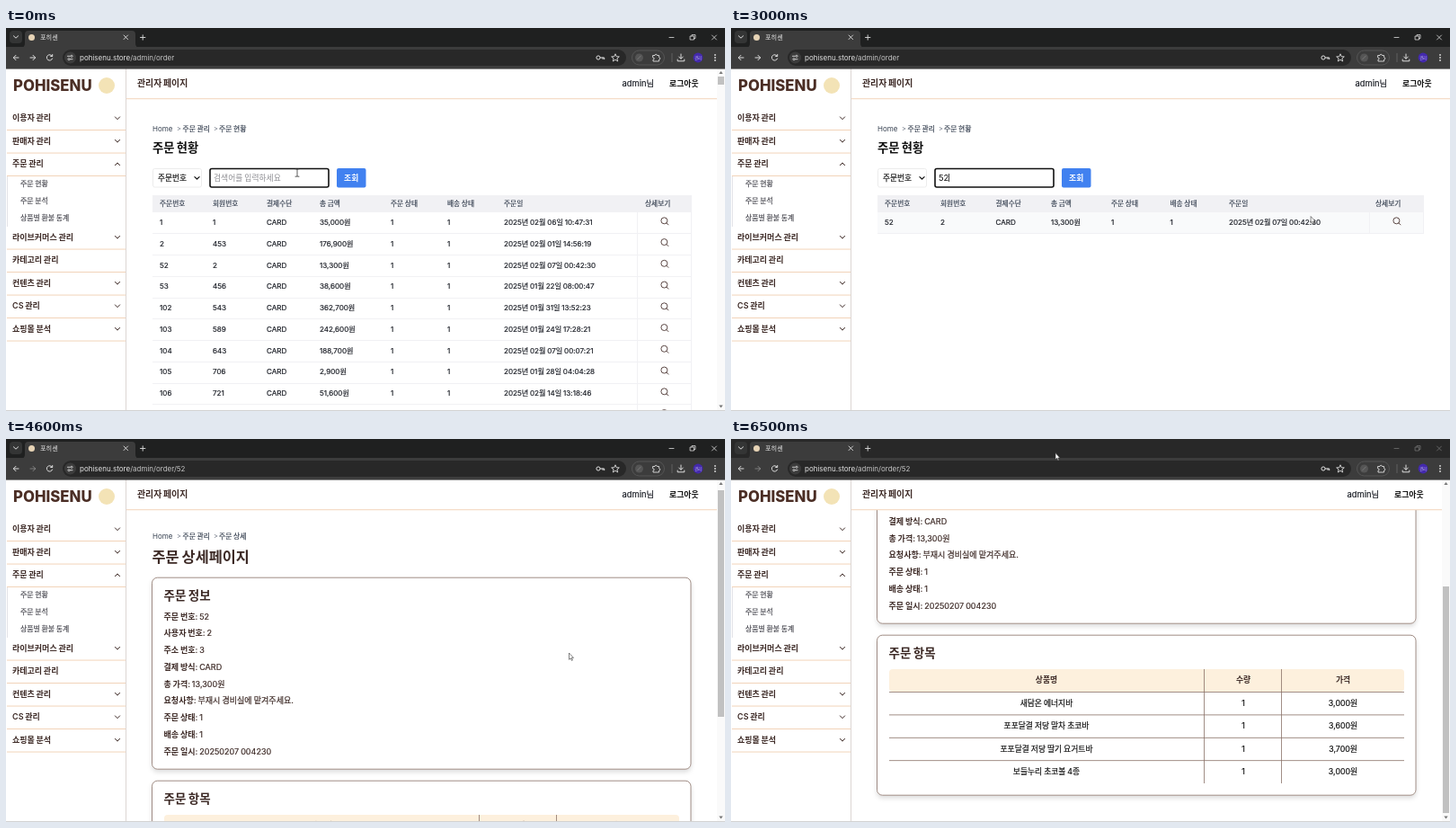
An HTML page for the animation above (6600 ms loop, 800 by 426 pixels).

```html
<!DOCTYPE html>
<html lang="ko">
<head>
<meta charset="utf-8">
<title>주문 관리</title>
<style>
  html, body { margin: 0; width: 100%; height: 100%; overflow: hidden; background: #fff; }
  svg { display: block; width: 100%; height: 100%; }
  text { font-family: Inter, 'Noto Sans CJK KR', 'Noto Sans CJK', sans-serif; white-space: pre; word-spacing: -.06em; }
  .hide { display: none; }
</style>
</head>
<body>
<svg id="stage" viewBox="0 0 800 426" xmlns="http://www.w3.org/2000/svg"></svg>
<script>
const LOOP = 6600, STEP = 100;
const BROWN = '#3d2a26', INK = '#1c1f27', PEACH = '#f1cfb2', RULE = '#8a7268', PALE = '#f1f1f4';

// Drawing helpers; text is placed by its vertical centre. Medium weight is thickened by a hairline.
const text = (x, y, s, size, fill = INK, weight = 400, extra = '') =>
  `<text x="${x}" y="${(y + size * 0.37).toFixed(2)}" font-size="${size}" fill="${fill}" ` +
  (weight === 500 ? `stroke="${fill}" stroke-width=".2" ` : `font-weight="${weight}" `) + `${extra}>${s}</text>`;
const mid = (x, y, s, size, fill, weight) => text(x, y, s, size, fill, weight, 'text-anchor="middle"');
const rect = (x, y, w, h, fill, r = 0, extra = '') =>
  `<rect x="${x}" y="${y}" width="${w}" height="${h}" rx="${r}" fill="${fill}" ${extra}/>`;
const line = (d, stroke, w = 1, extra = '') =>
  `<path d="${d}" fill="none" stroke="${stroke}" stroke-width="${w}" stroke-linecap="round" stroke-linejoin="round" ${extra}/>`;
const circle = (x, y, r, fill, extra = '') => `<circle cx="${x}" cy="${y}" r="${r}" fill="${fill}" ${extra}/>`;
const group = (id, body, extra = '') => `<g id="${id}" ${extra}>${body}</g>`;
const chevron = (x, y, k, color, w = 1) => line(`M${x - 2.6} ${y - k}L${x} ${y + k}L${x + 2.6} ${y - k}`, color, w);
const lens = (x, y) => circle(x - 0.6, y - 0.7, 3.5, 'none', 'stroke="#4a3430" stroke-width=".9"') +
  line(`M${x + 2} ${y + 1.9}l2 2`, '#4a3430', 0.9);

function browser() {
  const c = '#dedede';
  const bar = rect(0, 0, 800, 22, '#1f2020', 0, 'id="frame"') +
    rect(4, 3, 14, 14, '#343535', 4) + chevron(11, 10, 1.2, c) +
    `<path d="M16 22Q21 22 21 17V7Q21 3 25 3H140Q144 3 144 7V17Q144 22 149 22Z" fill="#3c3c3c"/>` +
    circle(28.5, 10.5, 3.5, '#e6d3b5') + text(38, 10.5, '포히센', 7.2, '#e8e8e8') +
    line('M131 8l4.6 4.6M135.6 8l-4.6 4.6', c, 0.9) + line('M149.5 10.5h5.4M152.2 7.8v5.4', c, 0.9);
  const win = group('win', line('M738 10.5h5', c, 0.8) +
    line('M761.5 9h4v4h-4zM763 9v-1.4h4v4h-1.5', c, 0.8) + line('M785.5 8l5 5M790.5 8l-5 5', c, 0.8));
  const tools = rect(0, 21, 800, 24.6, '#3c3c3c') + line('M14 33H8.5M11 30.3L8.3 33L11 35.7', c) +
    group('fwd', line('M27 33h5.5M30 30.3L32.7 33L30 35.7', c)) +
    line('M51.3 31.2A3.2 3.2 0 1 0 51.6 34M51.7 29.5v2h-2', c) +
    rect(63, 24, 627, 18, '#282828', 9) + circle(71.5, 33, 6.5, '#3c3c3c') +
    line('M68.5 31.3h2.6M74 34.7h-2.6', c, 0.9) + circle(73, 31.3, 1.1, 'none', `stroke="${c}" stroke-width=".8"`) +
    circle(70, 34.7, 1.1, 'none', `stroke="${c}" stroke-width=".8"`) +
    text(82, 33, '', 8, '#e4e4e4', 400, 'id="url"') +
    circle(659, 33, 2.1, 'none', `stroke="${c}"`) + line('M661.3 33h4.4v1.7M664 33v1.5', c) +
    `<path d="M678 28.8l1.2 2.9 3.1.2-2.4 2 .8 3.1-2.7-1.7-2.7 1.7.8-3.1-2.4-2 3.1-.2z" fill="none" stroke="${c}" stroke-width=".9"/>` +
    rect(696.5, 25, 36, 16, 'none', 8, 'stroke="#555"') + circle(704.5, 33, 4.5, '#555') +
    line('M702.5 35l3.8-4', '#777') +
    line('M720 30.5h2a1.2 1.2 0 0 1 2.4 0h2.2v2.2a1.2 1.2 0 0 1 0 2.4v1.9h-6.6v-1.8a1.2 1.2 0 0 0 0-2.4z', c, 0.9) +
    rect(740.5, 28, 1, 10, '#606060') + line('M751 29v5M748.7 32l2.3 2.3 2.3-2.3M747.2 35v1.8h7.6V35', c) +
    circle(770, 33, 5.4, '#4329ad') + mid(770, 33, '관리', 4.2, '#cfc8ee') +
    [30, 33, 36].map(y => circle(789, y, 0.9, c)).join('');
  return bar + win + tools;
}

function sidebar() {
  const items = [['이용자 관리', 100, 1], ['판매자 관리', 125.5, 1], ['주문 관리', 151, -1], ['라이브커머스 관리', 232.5, 1],
    ['카테고리 관리', 258, 0], ['컨텐츠 관리', 283.5, 1], ['CS 관리', 309, 1], ['쇼핑몰 분석', 334.5, 1]];
  const subs = ['주문 현황', '주문 분석', '상품별 환불 통계'];
  return rect(0, 45, 133, 380, '#fff') + rect(133, 45, 1, 380, '#dcd6d3') +
    text(8, 64, 'POHISENU', 16.8, '#4b2e25', 800) + circle(112, 64, 9, '#f3e3b6') +
    items.map(([s, y, dir]) => text(7, y, s, 9, BROWN, 600) + rect(1, y + 13.1, 132, 0.9, PEACH) +
      (dir ? chevron(124, y + 0.3, 1.4 * dir, BROWN) : '')).join('') +
    rect(1, 165, 1, 56, '#e3e3e8') +
    subs.map((s, i) => text(16, 173.2 + i * 18.8, s, 7.9, '#4a4a52', 500)).join('');
}

const crumbs = (y, last) => text(163, y, 'Home', 8, '#374151') + text(190, y, '&gt;', 7.5, '#6b7280') +
  text(196.5, y, '주문 관리', 7.8, '#374151', 500) + text(231, y, '&gt;', 7.5, '#6b7280') + text(237, y, last, 7.8, '#374151', 500);

function table(id, cols, edge, rows) {
  const heads = ['주문번호', '회원번호', '결제수단', '총 금액', '주문 상태', '배송 상태', '주문일', '상세보기'];
  const cell = edge - 61, pitch = 23.75;
  const body = rows.map((row, i) => {
    const y = 216 + i * pitch, vals = [row[0], row[1], 'CARD', row[2] + '원', 1, 1, row[3]];
    return (row[0] ? vals.map((v, k) => text(cols[k], y, v, 8.1, INK, 500)).join('') : '') +
      rect(163, Math.round(y + 12.3), edge - 163, 1, PALE) + lens(cell + 31, y - 1);
  }).join('');
  const h = rows.length * pitch;
  return group(id, rect(163, 186, edge - 163, 19, PALE) + (rows.length < 2 ? rect(163, 205, edge - 163, 24, '#f9fafb', 0, 'id="hover"') : '') +
    heads.map((s, k) => text(cols[k], 194.7, s, 7.7, '#374151', 500)).join('') + body +
    rect(cell, 205, 1, h, PALE) + rect(edge - 1, 205, 1, h, PALE));
}

function listPage() {
  const day = (m, d, clock) => `2025년 ${m}월 ${d}일 ${clock}`;
  const hit = [52, 2, '13,300', day('02', '07', '00:42:30')];
  const rows = [[1, 1, '35,000', day('02', '06', '10:47:31')], [2, 453, '176,900', day('02', '01', '14:56:19')], hit,
    [53, 456, '38,600', day('01', '22', '08:00:47')], [102, 543, '362,700', day('01', '31', '13:52:23')],
    [103, 589, '242,600', day('01', '24', '17:28:21')], [104, 643, '188,700', day('02', '07', '00:07:21')],
    [105, 706, '2,900', day('01', '28', '04:04:28')], [106, 721, '51,600', day('02', '14', '13:18:46')], ['']];
  return group('list', crumbs(112.5, '주문 현황') + text(163, 133, '주문 현황', 13.3, '#111', 700) +
    rect(163.5, 156.5, 54, 20.5, '#fff', 2, 'stroke="#ececec"') + text(169, 166.5, '주문번호', 8.7, '#111', 500) +
    chevron(212.5, 166.8, 1.2, '#111', 1.2) +
    rect(227, 156.5, 132, 20.5, '#fff', 2, 'id="field"') + text(231, 166.3, '', 9, '#111', 400, 'id="query"') +
    rect(242, 162, 0.8, 9, '#111', 0, 'id="caret"') +
    rect(368, 156, 32.5, 21.5, '#4181f0', 2) + mid(384.2, 166.5, '조회', 8.8, '#fff', 600) +
    table('all', [171, 230, 290, 349, 428, 491, 554, 711], 763, rows) +
    table('found', [171, 233, 294.5, 356, 423, 488.5, 554, 717], 771, [hit]));
}

function detailPage() {
  const info = [['주문 번호', 52], ['사용자 번호', 2], ['주소 번호', 3], ['결제 방식', 'CARD'], ['총 가격', '13,300원'],
    ['요청사항', '부재시 경비실에 맡겨주세요.'], ['주문 상태', 1], ['배송 상태', 1], ['주문 일시', '20250207 004230']];
  const goods = [['상품명', '수량', '가격'], ['새담온 에너지바', 1, '3,000원'], ['포포달결 저당 말차 초코바', 1, '3,600원'],
    ['포포달결 저당 딸기 요거트바', 1, '3,700원'], ['보들누리 초코볼 4종', 1, '3,000원']];
  const card = (y, h) => rect(162.5, y, 599.5, h, '#fff', 6, `stroke="${RULE}" stroke-width=".8" filter="url(#soft)"`);
  const infoRows = info.map(([k, v], i) => text(175.5, 197.2 + i * 18.75,
    `${k}: <tspan font-weight="400" fill="${BROWN}" stroke="${BROWN}" stroke-width=".2">${v}</tspan>`, 9.05, BROWN, 600)).join('');
  const goodRows = goods.map((row, i) => {
    const y = 430.2 + i * 25.4;
    return row.map((v, k) => mid([351, 570, 681][k], y, v, 8.8, i ? '#111' : BROWN, i ? 500 : 600)).join('') +
      (i < 4 ? rect(176, y + 12.9, 573, 0.8, RULE) : '');
  }).join('');
  return `<g id="detail" clip-path="url(#view)">` + group('scroll',
    crumbs(108, '주문 상세') + text(162.5, 130.5, '주문 상세페이지', 16.4, BROWN, 700) +
    card(154.2, 213) + text(175.5, 173.5, '주문 정보', 13.5, BROWN, 700) + infoRows +
    card(380.2, 178) + text(175.5, 399.5, '주문 항목', 13.5, BROWN, 700) +
    rect(176, 418, 573, 25, '#fdf0dd', 4) + goodRows +
    rect(526.1, 418, 0.8, 127, RULE) + rect(612.1, 418, 0.8, 127, RULE)) + '</g>';
}

const header = rect(134, 45, 666, 34, '#fff') + rect(134, 78.3, 666, 0.9, PEACH) +
  text(146, 61.5, '관리자 페이지', 9.9, BROWN, 700) +
  group('user', text(685.5, 61.5, 'admin님', 9.4, INK, 500) + text(738, 61.5, '로그아웃', 8.9, '#111', 600));
const scrollbar = group('bar', rect(791, 45, 9, 380, '#fafafa') + rect(792, 54, 7, 9, '#c1c1c1', 0, 'id="thumb"') +
  '<path d="M793.3 51l2.2-3 2.2 3zM793.3 419.500l2.2 3 2.2-3z" fill="#777"/>');
const cursors = group('cursor',
  group('ibeam', line('M-2-4.200h1.500l.5.5.5-.5H2M0-4V4M-2 4.200h1.500l.5-.5.5.5H2', '#333', 0.8)) +
  group('arrow', '<path d="M0 0V7.300l1.700-1.500 1.200 2.600 1.100-.5-1.200-2.500H5z" fill="#fff" stroke="#333" stroke-width=".6"/>') +
  group('hand', '<path d="M-.8 3.500V-2.500q0-1 .9-1t.9 1V0q2.700-.3 2.900 1.400v2.100q0 2.300-1.300 3H-.4L-3 2.900q-.2-1.200 1-.9z" fill="#fff" stroke="#222" stroke-width=".7"/>'));

document.getElementById('stage').innerHTML =
  `<defs><clipPath id="view"><rect x="134" y="79" width="657" height="346"/></clipPath>
   <filter id="soft" x="-5%" y="-10%" width="110%" height="125%"><feDropShadow dx="0" dy="3" stdDeviation="2.500" flood-opacity=".13"/></filter></defs>` +
  rect(0, 0, 800, 426, '#fff') + listPage() + detailPage() + header + sidebar() + scrollbar +
  rect(0, 425, 800, 1, '#d2d2d2') + browser() + cursors;

const $ = id => document.getElementById(id);
const set = (id, attrs) => { for (const k in attrs) $(id).setAttribute(k, attrs[k]); };
const show = (id, on) => $(id).classList.toggle('hide', !on);
const clamp = v => Math.max(0, Math.min(1, v));
const ease = v => v * v * (3 - 2 * v);

// Pointer stops: time, x, y
const path = [[0, 324, 161], [1900, 324, 161], [2200, 365.5, 185.5], [2400, 365.5, 185.5], [3300, 743, 218],
  [3900, 743, 218], [4500, 626.5, 238], [4800, 626.5, 238], [5200, 621.5, 215], [5700, 621.5, 215], [6400, 361, 15.5], [LOOP, 361, 15.5]];

function pointer(t) {
  const i = path.findIndex(p => p[0] > t), a = path[i - 1], b = path[i];
  const k = ease((t - a[0]) / (b[0] - a[0]));
  return [a[1] + (b[1] - a[1]) * k, a[2] + (b[2] - a[2]) * k];
}

function draw(t) {
  const detail = t >= 3900, found = t >= 1800 && !detail, focus = t < 3600;
  const typed = t < 1300 ? '' : t < 1500 ? '5' : '52';
  const [x, y] = pointer(t);

  show('list', !detail);
  show('detail', detail);
  show('all', !found);
  show('found', found);
  show('hover', x < 771 && y > 205 && y < 229);
  show('bar', !found);
  set('user', { transform: `translate(${found ? 9 : 0} 0)` });

  $('query').textContent = typed || '검색어를 입력하세요';
  set('query', { fill: typed ? '#111' : '#8d8d92', 'font-size': typed ? 9.4 : 8.8 });
  set('field', { stroke: focus ? '#111' : '#ececec', 'stroke-width': focus ? 1.6 : 1 });
  const blink = typed ? t < 1700 || (t - 1700) % 1060 < 530 : t >= 300 && t < 800;
  show('caret', focus && blink);
  set('caret', { x: 231 + typed.length * 5.6 });

  const p = ease(clamp((t - 4600) / 300));
  set('scroll', { transform: `translate(0 ${-162 * p})` });
  set('thumb', detail ? { y: 57 + 107 * p, height: 252 } : { y: 54, height: 9 });

  $('url').innerHTML = 'pohisenu.store<tspan fill="#c4c4c4">/admin/order' + (detail ? '/52' : '') + '</tspan>';
  set('fwd', { opacity: detail ? 0.4 : 1 });
  const idle = t >= 6500;
  set('frame', { fill: idle ? '#282828' : '#1f2020' });
  set('win', { opacity: idle ? 0.4 : 1 });

  const kind = t <= 2400 ? 'ibeam' : !detail && x > 730 ? 'hand' : 'arrow';
  for (const id of ['ibeam', 'arrow', 'hand']) show(id, id === kind);
  set('cursor', { transform: `translate(${x} ${y})` });
}

const start = performance.now();
function tick() {
  const t = (performance.now() - start) % LOOP;
  draw(Math.floor(t / STEP) * STEP);
  requestAnimationFrame(tick);
}
tick();
</script>
</body>
</html>
```
